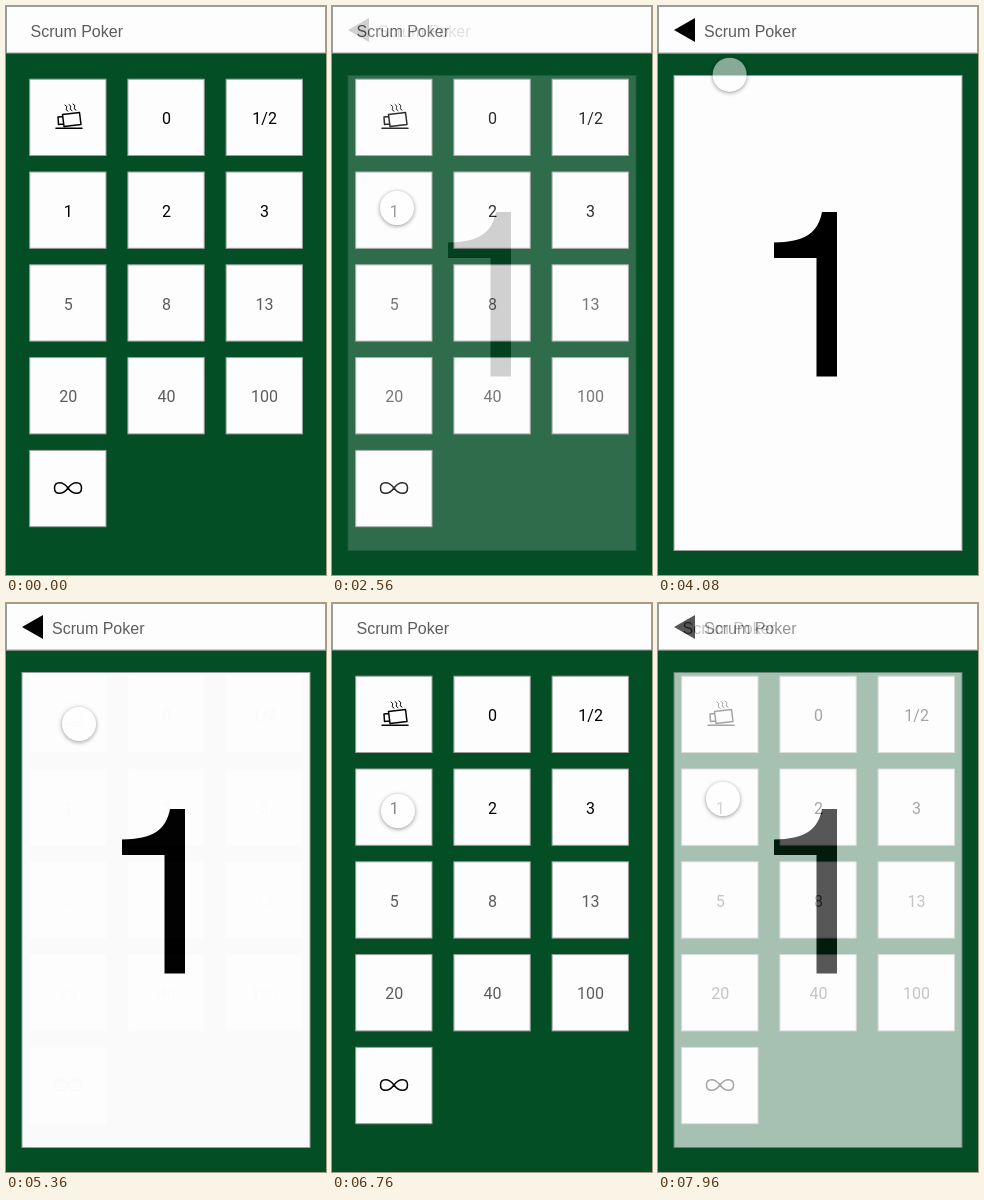
An HTML page for the animation above (8000 ms loop, 320 by 569 pixels).

```html
<!DOCTYPE html>
<html lang="en">
<head>
<meta charset="utf-8">
<title>Scrum Poker</title>
<style>
html, body { margin: 0; width: 100%; height: 100%; overflow: hidden; background: #044e26; }
svg { position: absolute; left: 0; top: 0; }
text { font: 16px "Liberation Sans", Arial, sans-serif; fill: #5c5c5c; }
.value { font-family: Roboto, "Liberation Sans", sans-serif; text-anchor: middle; }
.box { fill: #fdfdfd; stroke: #9a9f9b; }
.line { fill: none; stroke: #000; stroke-linejoin: round; stroke-linecap: round; }
#touch {
  position: absolute; left: -17px; top: -17px; width: 34px; height: 34px; border-radius: 50%;
  background: rgba(255, 255, 255, .52); box-shadow: 0 1px 4px rgba(0, 0, 0, .42);
}
</style>
</head>
<body>
<svg width="320" height="569" viewBox="0 0 320 569">
  <rect class="box" x=".5" y=".5" width="319" height="46.5"/>
  <text x="24.5" y="30.5">Scrum Poker</text>
  <g id="cards"></g>
  <g class="line">
    <path stroke-width="1.5" d="M56.5 108.5 73.5 106.5 75 118.5 58 120.5ZM56.5 110.5 52 111 52.5 118.5 57.5 118M50 122.3H76"/>
    <path d="M59 99q3 1.5 1.5 3.2t1.5 3M63 98.500q3 1.5 1.5 3.200t1.500 3M67 98q3 1.5 1.500 3.200t1.500 3"/>
    <path stroke-width="1.5" d="M62 482C57 475 48.500 475 48.500 482S57 489 62 482 75.500 475 75.500 482 67 489 62 482Z"/>
  </g>
  <g id="detail">
    <rect class="box" x=".5" y=".5" width="319" height="46.5"/>
    <path d="M16 24 37 12V36Z"/>
    <text x="46" y="30.5">Scrum Poker</text>
    <rect class="box" x="16" y="69.5" width="288" height="475"/>
    <path d="M179 206V370.500H158.500V252H116V236.500C147 236 160 227 164 206Z"/>
  </g>
</svg>
<div id="touch"></div>
<script>
const LOOP = 8000;
const values = ["", "0", "1/2", "1", "2", "3", "5", "8", "13", "20", "40", "100", ""];
const cards = document.getElementById("cards");
const detail = document.getElementById("detail");
const touch = document.getElementById("touch");

cards.innerHTML = values.map((value, i) => {
  const x = 23.7 + i % 3 * 98.2, y = 73.2 + Math.floor(i / 3) * 92.8;
  const color = i < 6 ? "#000" : "#5c5c5c";
  return `<rect class="box" x="${x}" y="${y}" width="76.3" height="76.3"/>
    <text class="value" x="${x + 38.5}" y="${y + 44.8}" style="fill:${color}">${value}</text>`;
}).join("");

// time, x, y
const path = [
  [0, 243, -22], [400, 172, 66], [840, 108, 138], [1680, 75, 190], [1960, 66, 201], [2240, 65, 202],
  [3200, 65, 202], [3460, 80, 173], [3720, 89, 125], [4040, 75, 75], [4330, 47, 37],
  [4480, 47, 37], [5050, 73, 121], [5960, 73, 121], [6760, 66, 208],
  [7090, 66, 208], [7290, 65, 196], [LOOP, 65, 196]
];

const slope = (i, k) => (path[i + 1][k] - path[i][k]) / (path[i + 1][0] - path[i][0]);

// Harmonic tangents keep the curve from overshooting its points.
function tangent(i, k) {
  if (!i || i === path.length - 1) return slope(i ? i - 1 : 0, k);
  const a = slope(i - 1, k), b = slope(i, k);
  return a * b > 0 ? 2 * a * b / (a + b) : 0;
}

function position(t, k) {
  const i = path.findIndex((p, n) => n + 1 < path.length && t < path[n + 1][0]);
  const a = path[i], b = path[i + 1], d = b[0] - a[0], u = (t - a[0]) / d, v = 1 - u;
  return v * v * (1 + 2 * u) * a[k] + u * u * (3 - 2 * u) * b[k]
    + d * u * v * (v * tangent(i, k) - u * tangent(i + 1, k));
}

function ease(t, start, length) {
  const u = Math.min(1, Math.max(0, (t - start) / length));
  return u * u * (3 - 2 * u);
}

function draw(now) {
  const t = now % LOOP;
  detail.style.opacity = ease(t, 2390, 650) - ease(t, 5325, 550) + ease(t, 7570, 650);
  touch.style.transform = `translate(${position(t, 1)}px, ${position(t, 2)}px)`;
}

const start = performance.now();
function tick() {
  draw(performance.now() - start);
  requestAnimationFrame(tick);
}
tick();
</script>
</body>
</html>
```
